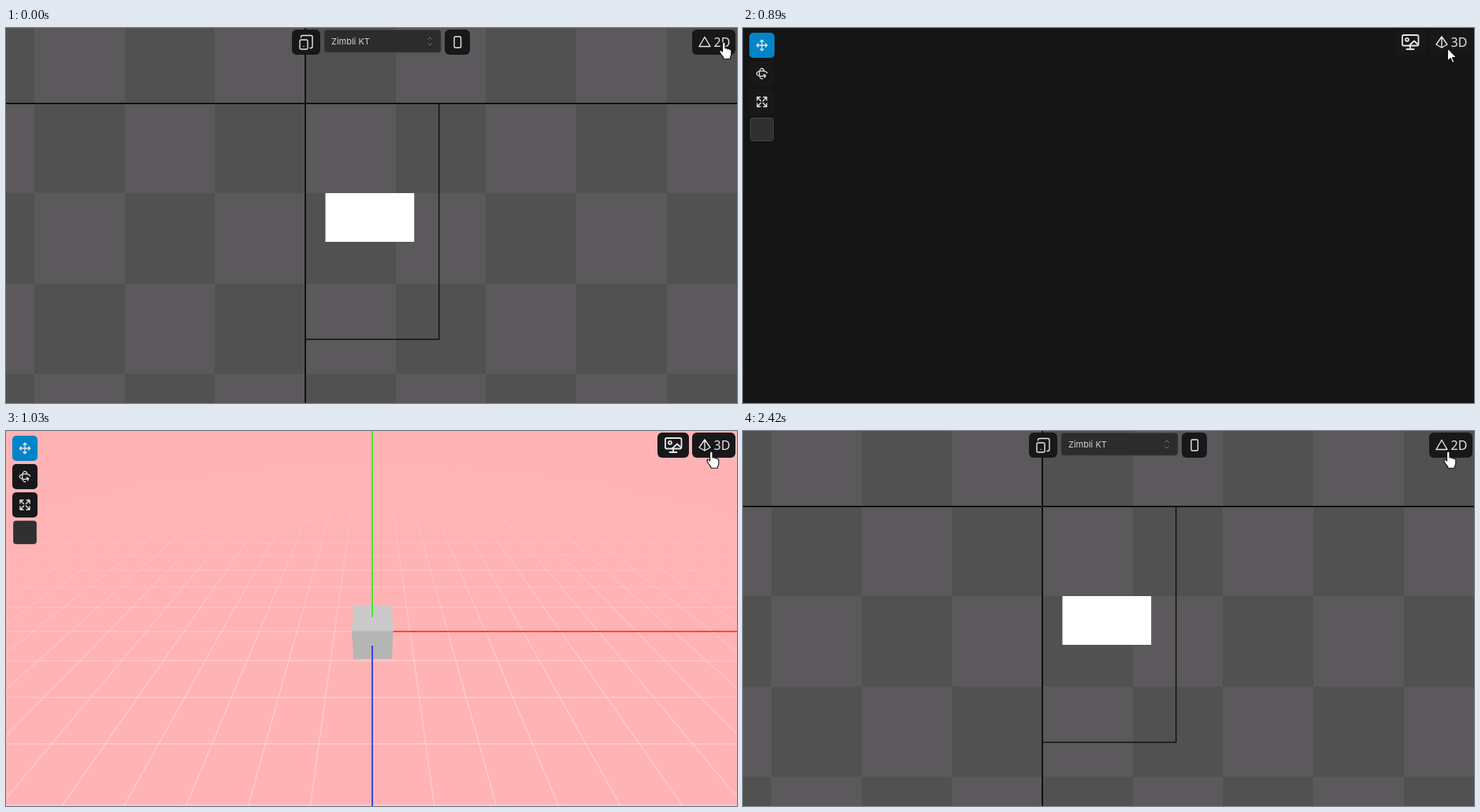
These frames come from a looping animation (928x477 px, 2.75 s). An HTML page:

```html
<!DOCTYPE html>
<html lang="en">
<head>
<meta charset="utf-8">
<title>2D / 3D view switch</title>
<style>
html, body { margin: 0; width: 100%; height: 100%; overflow: hidden; background: #151515; }
svg { display: block; width: 100%; height: 100%; }
.btn { fill: #18181a; }
.icon { fill: none; stroke: #e6e6e6; stroke-width: 1.4; stroke-linecap: round; stroke-linejoin: round; }
.tool { stroke-width: 2; }
.label { font: 16px "Noto Sans", "Open Sans", sans-serif; fill: #e2e2e2; }
.device { font: 11px Inter, sans-serif; fill: #d2d2d2; }
.cursor { fill: #fff; stroke: #111; stroke-width: 1.1; stroke-linejoin: round; }
</style>
</head>
<body>
<svg viewBox="0 0 928 477" preserveAspectRatio="none">
  <defs>
    <radialGradient id="fade" gradientUnits="userSpaceOnUse" cx="0" cy="0" r="440"
      gradientTransform="translate(465 477) scale(2 1)">
      <stop offset="0" stop-color="#fff" stop-opacity=".32"/>
      <stop offset=".45" stop-color="#fff" stop-opacity=".3"/>
      <stop offset="1" stop-color="#fff" stop-opacity="0"/>
    </radialGradient>
  </defs>

  <g id="flat">
    <rect width="928" height="477" fill="#515151"/>
    <path id="checks" fill="#5c595c" shape-rendering="crispEdges"/>
    <rect x="380" y="96" width="169.7" height="300" fill="none" stroke="#171717" stroke-width="1.6"/>
    <path d="M380 0V477M0 96H928" stroke="#121212" stroke-width="2"/>
    <rect x="405.5" y="210" width="112.7" height="62" fill="#fff"/>
    <rect class="btn" x="363" y="2" width="36" height="32" rx="6"/>
    <rect x="404" y="2.5" width="148" height="28.5" rx="3" fill="#2c2c2c" stroke="#424242"/>
    <rect class="btn" x="557" y="2" width="32" height="32" rx="6"/>
    <g class="icon">
      <rect x="373" y="15" width="10" height="12" rx="1.6"/>
      <path d="M374.5 12V11.5a2 2 0 0 1 2-2H387a2 2 0 0 1 2 2V23.500a2 2 0 0 1-2 2h-1M378 23.500v.1"/>
      <rect x="569" y="11" width="8.500" height="14" rx="1.5"/>
      <path stroke="#777" stroke-width="1" d="M535.5 14.5l2.500-2.500 2.500 2.500M535.5 19.500l2.500 2.500 2.500-2.500"/>
    </g>
    <text class="device" x="413" y="21">Zimbli KT</text>
  </g>

  <g id="deep">
    <rect width="928" height="477" fill="#ffb3b5"/>
    <g id="grid" fill="none" stroke="url(#fade)"></g>
    <path d="M441.500 222H489.500L491.500 254.500H439Z" fill="#cacaca"/>
    <path d="M439 254.500H491.500L489.800 290H441.200Z" fill="#b5b5b5"/>
    <g stroke-width="2">
      <path d="M465 0V237" stroke="#4de534"/>
      <path d="M491.500 255H928" stroke="#ff472f"/>
      <path d="M465 273V477" stroke="#4144e0"/>
    </g>
  </g>

  <rect id="blank" width="928" height="477" fill="#151515"/>

  <g id="tools">
    <rect x="8" y="6" width="32" height="32" rx="5" fill="#0284c9"/>
    <rect class="btn" x="8" y="42" width="32" height="32" rx="5"/>
    <rect class="btn" x="8" y="78" width="32" height="32" rx="5"/>
    <rect x="9.500" y="114.500" width="29" height="29" rx="3" fill="#303030" stroke="#444"/>
    <g class="icon tool">
      <path transform="translate(16 14) scale(.667)"
        d="M5 9l-3 3 3 3M9 5l3-3 3 3M15 19l-3 3-3-3M19 9l3 3-3 3M2 12h20M12 2v20"/>
      <path transform="translate(16 50) scale(.667)"
        d="M16.5 7.500C15.600 4.200 14 2 12 2 9.200 2 7 6.500 7 12s2.200 10 5 10l1-.2M15.200 13.700l3.800 1.900-1.900 3.800M19 15.600c-1.800.9-4.300 1.400-7 1.400-5.500 0-10-2.200-10-5s4.500-5 10-5c4.800 0 8.900 1.700 9.800 4"/>
      <path transform="translate(16 86) scale(.667)"
        d="M15 3h6v6M9 21H3v-6M21 3l-7 7M3 21l7-7M21 15v6h-6M3 9V3h6M21 21l-7-7M3 3l7 7"/>
    </g>
    <rect class="btn" x="827" y="2" width="40" height="32" rx="6"/>
    <g class="icon" stroke-width="1.8" style="stroke-width:1.8">
      <rect x="837" y="9" width="20.500" height="13.500" rx="2"/>
      <circle cx="843" cy="14.800" r="2"/>
      <path d="M846 22l6-5.500 5 4.500M847 23v4M842.500 27h9"/>
    </g>
  </g>

  <g id="mode">
    <rect class="btn" x="871" y="2" width="55" height="32" rx="6"/>
    <path id="shape" class="icon"/>
    <text id="label" class="label" x="898.500" y="24"></text>
  </g>

  <g id="load">
    <rect width="928" height="477" opacity=".8"/>
    <circle cx="465" cy="255" r="25.500" fill="none" stroke="#12a0e8" stroke-width="7"
      pathLength="360" stroke-dasharray="270 90" transform="rotate(-118 465 255)"/>
  </g>

  <circle id="click" cx="894" cy="25.500" r="12.300" fill="#d6cd08"/>
  <path id="hand" class="cursor" d="M4.600 13V2.700a1.700 1.700 0 0 1 3.400 0V9c.8-.9 2.600-.6 2.800.6.9-.7 2.500-.3 2.700.9 1-.5 2.300.1 2.300 1.400V16c0 2.600-1.400 3.400-1.600 6.300H6.200C6 19.800 4 18.300 2.600 16.200 1.600 14.600.6 13.400.9 12.300c.5-1.500 2.300-1 3.700.9Z"/>
  <path id="arrow" class="cursor" d="M894.500 25.500V42l3.700-3.500 2.500 5.700 2.300-1-2.500-5.600h5.300Z"/>
</svg>

<script>
const LOOP = 2750;
const $ = id => document.getElementById(id);
const show = (id, on) => $(id).style.display = on ? '' : 'none';

function buildChecks() {
  const size = 114.67;
  let d = '';
  for (let col = -4; col < 5; col++)
    for (let row = -1; row < 4; row++)
      if ((col + row) % 2 === 0)
        d += `M${380 + col * size} ${95.7 + row * size}h${size}v${size}h${-size}z`;
  $('checks').setAttribute('d', d);
}

// Floor lines in perspective; the vanishing point is (465, -88).
function buildGrid() {
  let lines = '';
  const add = (d, width) => lines += `<path d="${d}" stroke-width="${width}"/>`;
  for (let n = -16; n <= 4; n++) {
    const y = 3499 / (10.2 - n) - 88;
    add(`M0 ${y}H928`, 0.8 + y / 400);
  }
  const x = (i, y) => 465 + i * 0.1395 * (y + 88);
  for (let i = -26; i <= 26; i++)
    if (i) add(`M${x(i, 40)} 40L${x(i, 480)} 480`, 1.5);
  $('grid').innerHTML = lines;
}

// The pointer travels along a shallow arc in six steps.
function handPosition(t) {
  const p = Math.min(6, Math.floor((t + 2) / 72)) / 6;
  const bend = (a, b, c) => a * (1 - p) ** 2 + 2 * b * p * (1 - p) + c * p * p;
  return [bend(905, 897, 889), bend(17, 2, 25)];
}

function clickAlpha(t) {
  const age = t >= 2220 ? t - 2220 : t - 700;
  const end = t >= 2220 ? 200 : 130;
  if (age < 0 || age >= end) return 0;
  return age < 70 ? 0.8 : 0.4;
}

function render(t) {
  const flat = t < 890 || t >= 2420;
  const blank = t >= 890 && t < 960;
  show('flat', flat);
  show('deep', !flat);
  show('tools', !flat);
  show('blank', blank);
  show('load', t >= 960 && t < 1030);
  show('arrow', blank);
  show('hand', !blank);
  $('shape').setAttribute('d', flat
    ? 'M887 11.5L894 23.5H880Z'
    : 'M887 11L880 21L887 25L894 21ZM887 11V25');
  $('label').textContent = flat ? '2D' : '3D';
  $('mode').setAttribute('transform', `translate(0 ${t >= 830 && t < 890 ? 1 : 0})`);
  $('click').setAttribute('opacity', clickAlpha(t));
  $('hand').setAttribute('transform', `translate(${handPosition(t)})`);
}

buildChecks();
buildGrid();
const start = performance.now();
function tick() {
  render((performance.now() - start) % LOOP);
  requestAnimationFrame(tick);
}
tick();
</script>
</body>
</html>
```
